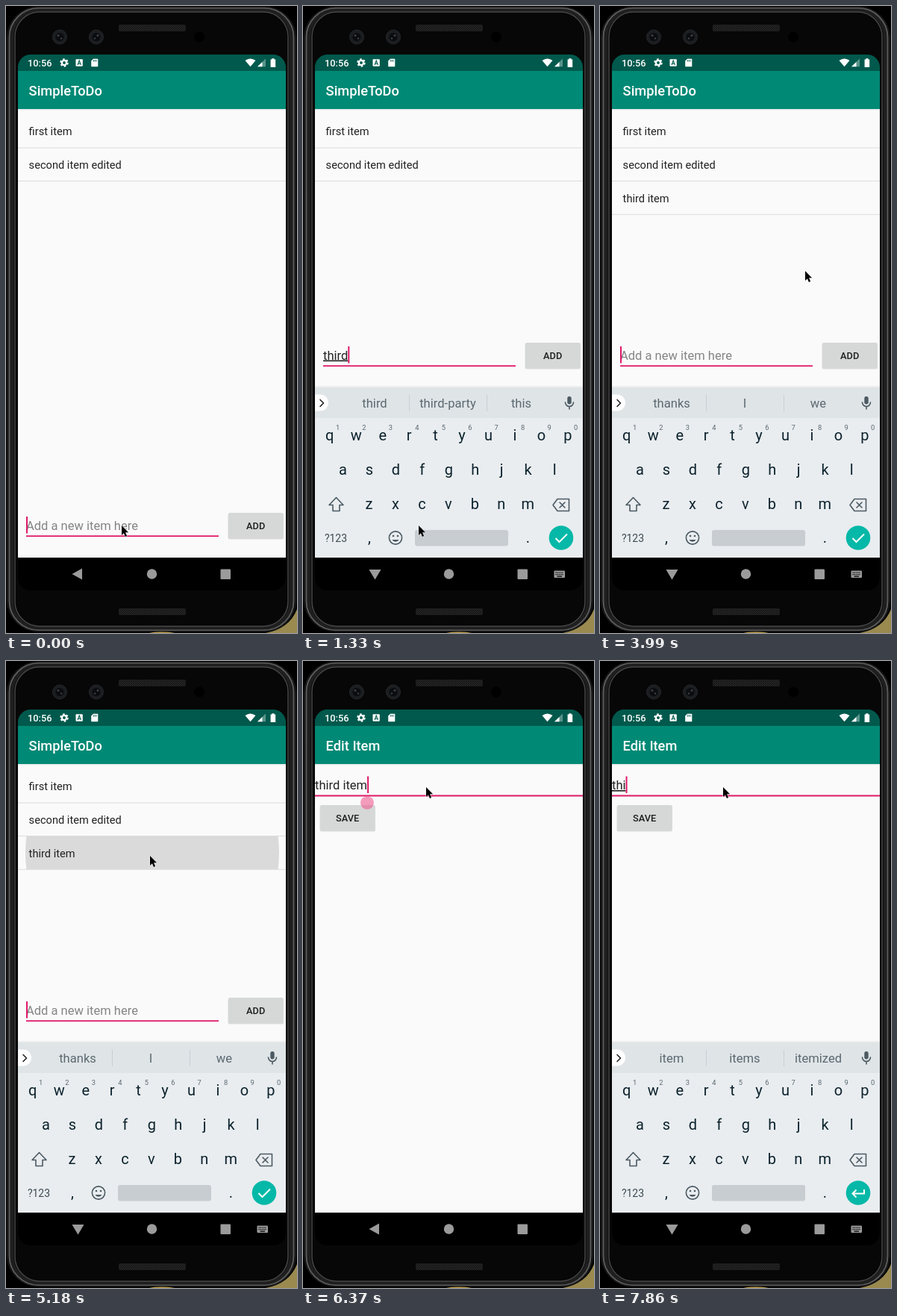
An HTML page that plays this animation: 390 by 840 pixels, repeating every 8 s.

```html
<!DOCTYPE html>
<html lang="en">
<head>
<meta charset="utf-8">
<title>To-do list demo</title>
<style>
html, body { margin: 0; width: 100%; height: 100%; overflow: hidden; background: #000; }
svg { display: block; width: 390px; height: 840px; }
text { font-family: Roboto, sans-serif; white-space: pre; }
.title { font-size: 18.28px; font-weight: 500; fill: #fff; }
.item { font-size: 14.63px; fill: #212121; }
.field { font-size: 16.55px; fill: #222; }
.label { font-size: 12.8px; font-weight: 500; fill: #1f1f1f; text-anchor: middle; }
.toast { font-size: 12.8px; fill: #333; text-anchor: middle; }
.key { font-size: 20px; fill: #0c222c; text-anchor: middle; }
.digit { font-size: 9.3px; fill: #5a6870; text-anchor: middle; }
.suggestion { font-size: 16.6px; fill: #5b6970; text-anchor: middle; }
.composing { text-decoration: underline; text-decoration-thickness: 1px; }
.icon { fill: none; stroke: #4c5a62; stroke-width: 1.6; stroke-linejoin: round; stroke-linecap: round; }
</style>
</head>
<body>
<svg viewBox="0 0 390 840">
  <defs>
    <clipPath id="screenClip"><rect x="16" y="65" width="359" height="718" rx="17"/></clipPath>
    <clipPath id="revealClip"><rect id="reveal" x="16" y="65" width="359" height="718"/></clipPath>
    <clipPath id="imeClip"><rect x="16" y="505" width="359" height="234"/></clipPath>
    <clipPath id="rowClip"><rect x="16" y="235" width="359" height="44"/></clipPath>
    <linearGradient id="shade" x2="0" y2="1">
      <stop stop-color="#000" stop-opacity=".09"/><stop offset="1" stop-color="#000" stop-opacity="0"/>
    </linearGradient>
    <pattern id="mesh" width="3" height="3" patternUnits="userSpaceOnUse">
      <rect width="3" height="3" fill="#262626"/><path d="M0 0L3 3M3 0L0 3" stroke="#141414" stroke-width=".8"/>
    </pattern>
  </defs>

  <!-- Phone body -->
  <rect width="390" height="840" fill="#000"/>
  <path d="M390 808V840H348Q380 834 390 808Z" fill="#9a8a50"/>
  <path d="M192 840Q208 836 226 840Z" fill="#b99a45"/>
  <g fill="none">
    <rect x="1.5" y="1" width="387" height="837" rx="42" fill="#101010" stroke="#1d1d1d"/>
    <rect x="4.5" y="3" width="381" height="833" rx="39" stroke="#5c5c5c" stroke-width="2"/>
    <rect x="8" y="5.5" width="374" height="828" rx="36" stroke="#1f1f1f" stroke-width="4"/>
    <rect x="12" y="8" width="366" height="823" rx="33" fill="#070707" stroke="#484848" stroke-width="1.4"/>
  </g>
  <rect x="151" y="25" width="90" height="9" rx="2" fill="url(#mesh)"/>
  <rect x="151" y="807" width="90" height="9" rx="2" fill="url(#mesh)"/>
  <g fill="#1b1d20" stroke="#25282b">
    <circle cx="72" cy="41.5" r="9.5"/><circle cx="121" cy="41.5" r="9.5"/>
  </g>
  <g fill="#0a0c0e"><circle cx="72" cy="41.5" r="5.5"/><circle cx="121" cy="41.5" r="5.5"/></g>
  <g fill="#3a424a"><circle cx="70" cy="39.5" r="1.5"/><circle cx="74" cy="43.5" r="1.2"/><circle cx="123" cy="39.5" r="1.5"/><circle cx="119" cy="43.5" r="1.2"/></g>
  <circle cx="259" cy="41.5" r="7" fill="#000"/>

  <g clip-path="url(#screenClip)">
    <rect x="16" y="65" width="359" height="718" fill="#000"/>

    <!-- List screen -->
    <g id="list">
      <rect x="16" y="87" width="359" height="652" fill="#fafafa"/>
      <g id="ripple" clip-path="url(#rowClip)"><circle id="rippleDisc" cx="196" cy="257" fill="#dadada"/></g>
      <path d="M16 190H375M16 234.5H375" stroke="#dcdcdc"/>
      <text class="item" x="30.6" y="173">first item</text>
      <text class="item" x="30.6" y="218">second item edited</text>
      <g id="third">
        <path d="M16 279.3H375" stroke="#dcdcdc"/>
        <text class="item" x="30.6" y="263">third item</text>
      </g>
      <g id="entry">
        <text id="hint" class="field" x="27" y="701.5" style="fill:#848484">Add a new item here</text>
        <rect x="27" y="709.3" width="258" height="1.8" fill="#e01868"/>
        <g id="addButton"></g>
      </g>
    </g>
    <rect id="dim" x="16" y="65" width="359" height="718" fill="#000" opacity=".11"/>

    <!-- Edit screen -->
    <g id="editWrap" clip-path="url(#revealClip)">
      <g id="edit">
        <rect x="16" y="87" width="359" height="652" fill="#fafafa"/>
        <rect id="editLine" x="16" y="179.5" width="359"/>
        <g id="saveButton"></g>
      </g>
    </g>

    <g id="typing">
      <text id="typed" class="field"><tspan id="plain"></tspan><tspan id="composing" class="composing"></tspan></text>
      <rect id="caret" width="2" height="22.5" fill="#e01868"/>
    </g>
    <path id="handle" d="M86 180.5L92.5 183.5A9 9 0 1 1 79.5 183.5Z" fill="#f0588f" opacity=".58"/>

    <g id="toast">
      <rect x="122" y="673" width="147" height="44" rx="21" fill="#e6e6e6"/>
      <text class="toast" x="195" y="700">Item added to list.</text>
    </g>

    <!-- Keyboard -->
    <g clip-path="url(#imeClip)">
      <g id="ime">
        <rect x="16" y="509" width="359" height="3" fill="#000" opacity=".05"/>
        <rect x="16" y="511" width="359" height="228" fill="#e9edf0"/>
        <rect x="16" y="511" width="359" height="41" fill="#dfe4e7"/>
        <path d="M16 520.5H23A11 11 0 0 1 23 542.5H16Z" fill="#fff"/>
        <path d="M23 527.5L27.5 532 23 536.5" class="icon" style="stroke:#222"/>
        <path d="M142.5 521V543M246.5 521V543" stroke="#c9d0d4"/>
        <g id="suggestions"></g>
        <rect x="354.3" y="523" width="5.4" height="10.5" rx="2.7" fill="#4c5a62"/>
        <path d="M351.5 531A5.5 5.5 0 0 0 362.5 531M357 537V540" class="icon"/>
        <g id="keys"></g>
        <path d="M44.5 658.5L54 668.5H49V676.5H40V668.5H35Z" class="icon"/>
        <path d="M341 660.5H356.5V676.5H341L335 668.5ZM344 665L351 672M351 665L344 672" class="icon"/>
        <text class="key" x="44" y="718" style="font-size:14px;fill:#3c4a52">?123</text>
        <circle cx="124" cy="712.5" r="8.6" class="icon"/>
        <path d="M119.5 715A5 5 0 0 0 128.5 715Z" fill="#4c5a62"/>
        <circle cx="121" cy="710" r="1.3" fill="#4c5a62"/><circle cx="127" cy="710" r="1.3" fill="#4c5a62"/>
        <rect x="150" y="702" width="125" height="21.5" rx="3" fill="#c8cdd1"/>
        <circle cx="346" cy="712.5" r="16.3" fill="#05b8a7"/>
        <path id="enterIcon" class="icon" style="stroke:#fff;stroke-width:2;stroke-linecap:butt;stroke-linejoin:miter"/>
      </g>
    </g>

    <!-- Navigation bar -->
    <g fill="#9b9b9b">
      <path id="back"/>
      <circle cx="195.5" cy="761" r="6.7"/>
      <rect x="287.5" y="754.5" width="13.5" height="13.5" rx="1"/>
      <g id="imeSwitch">
        <rect x="336.5" y="756.5" width="14.5" height="9.5" rx="1"/>
        <path d="M338.5 759.2H349M338.5 761.6H349" stroke="#000" stroke-width="1.3" stroke-dasharray="1.3 .9"/>
        <path d="M340.5 764.2H347" stroke="#000" stroke-width="1.2"/>
      </g>
    </g>

    <!-- Status bar -->
    <g fill="#fff">
      <text x="29" y="81" style="font-size:12.8px;font-weight:500">10:56</text>
      <circle cx="78" cy="76" r="3.1" fill="none" stroke="#fff" stroke-width="2.4"/>
      <circle cx="78" cy="76" r="4.8" fill="none" stroke="#fff" stroke-width="1.9" stroke-dasharray="2.6 2.426"/>
      <rect x="93.5" y="71.2" width="9.3" height="9.6" rx="1"/>
      <path d="M96 79L98.2 73 100.4 79M96.8 77.2H99.6" fill="none" stroke="#00594c" stroke-width="1.1"/>
      <path d="M117 70.7H122.5Q123.3 70.7 123.3 71.5V80.5Q123.3 81.3 122.5 81.3H115Q114.2 81.3 114.2 80.5V73.5Z"/>
      <path d="M117.3 72.3V74.5M119.2 72.3V74.5M121.1 72.3V74.5" stroke="#00594c"/>
      <path d="M327.5 81.3L320.5 73Q327.5 67.8 334.5 73Z"/>
      <path d="M348 70.5V81.3H337Z" opacity=".35"/><path d="M343.5 75V81.3H337Z"/>
      <path d="M356.4 70.3H359.4V71.4H361.2V82H354.6V71.4H356.4Z"/>
    </g>
  </g>

  <g id="cursor">
    <path d="M0 0V13L2.9 10.2 4.9 14.9 7.1 14 5.1 9.3H9.1Z" stroke="#fff" stroke-width=".9" paint-order="stroke"/>
  </g>
</svg>

<script>
const LOOP = 8000;
const $ = id => document.getElementById(id);
const set = (id, attrs) => { for (const k in attrs) $(id).setAttribute(k, attrs[k]); };
const show = (id, on) => { $(id).style.display = on ? '' : 'none'; };
const label = (cls, x, y, s) => `<text class="${cls}" x="${x}" y="${y}">${s}</text>`;

const appBar = title => `
  <rect x="16" y="65" width="359" height="22" fill="#00594c"/>
  <rect x="16" y="138" width="359" height="2.5" fill="url(#shade)"/>
  <rect x="16" y="87" width="359" height="51" fill="#008975"/>
  ${label('title', 30.6, 120, title)}`;
const button = (x, y, name) => `
  <rect x="${x - .5}" y="${y + .5}" width="74.5" height="35" rx="2.5" fill="#000" opacity=".13"/>
  <rect class="face" x="${x}" y="${y}" width="73.5" height="34" rx="2" fill="#d6d7d7"/>
  ${label('label', x + 36.7, y + 21.6, name)}`;

$('list').insertAdjacentHTML('beforeend', appBar('SimpleToDo'));
$('edit').insertAdjacentHTML('beforeend', appBar('Edit Item'));
$('addButton').innerHTML = button(298, 679, 'ADD');
$('saveButton').innerHTML = button(23, 193, 'SAVE');

const keyRow = (chars, x, y) =>
  [...chars].map((c, i) => label('key', x + i * 35.45, y, c)).join('');
$('keys').innerHTML =
  keyRow('qwertyuiop', 35.8, 582) + keyRow('asdfghjkl', 53.5, 628) + keyRow('zxcvbnm', 88.5, 674) +
  [...'1234567890'].map((c, i) => label('digit', 46.5 + i * 35.45, 567.5, c)).join('') +
  label('key', 89, 719, ',') + label('key', 301.5, 719, '.');
$('suggestions').innerHTML = [96, 194, 292.5].map(x => label('suggestion', x, 538, '')).join('');
const suggestionTexts = [...$('suggestions').children];

// Each step changes only the listed properties; `word` is where the composing word starts.
const START = {
  at: 0, edit: false, text: '', word: 0, caret: true, ime: 0, words: 'thanks,I,we', added: false,
  pressed: false, ripple: 0, focus: false, handle: false, toast: 0, shift: 0, rise: 0, top: 65, mouse: [155, 696]
};
const STEPS = [
  { at: 150, ime: .6 },
  { at: 300, ime: 1 },
  { at: 600, caret: false },
  { at: 890, caret: true, text: 't', words: 'the,to,that' },
  { at: 1040, text: 'th', words: 'the,this,that' },
  { at: 1180, text: 'thi', words: 'this,think,thing' },
  { at: 1330, text: 'third', words: 'third,third-party,this' },
  { at: 1480, text: 'third ', word: 6, words: 'party,time,one' },
  { at: 1630, text: 'third i', words: 'is,in,I' },
  { at: 1780, text: 'third it', words: 'it,its,item' },
  { at: 1920, text: 'third ite', words: 'item,items,ite' },
  { at: 2070, text: 'third item', words: 'item,items,itemized' },
  { at: 2360, mouse: [190, 655] },
  { at: 2510, mouse: [290, 560], caret: false },
  { at: 2660, mouse: [368, 486] },
  { at: 2810, mouse: [342, 472] },
  { at: 2960, mouse: [331, 469], caret: true },
  { at: 3110, pressed: true },
  { at: 3250, text: '', word: 0, added: true, words: 'thanks,I,we' },
  { at: 3400, pressed: false },
  { at: 3550, caret: false },
  { at: 3840, mouse: [318, 440] },
  { at: 3990, mouse: [275, 355], caret: true },
  { at: 4140, mouse: [225, 275] },
  { at: 4280, mouse: [200, 245] },
  { at: 4430, mouse: [194, 256] },
  { at: 4580, mouse: [193, 261] },
  { at: 5180, ripple: 170 },
  { at: 5330, ripple: 200, ime: 0, edit: true, text: 'third item', word: 10, shift: -8, rise: 17, top: 320, toast: .65 },
  { at: 5480, shift: -12, rise: 5.5, top: 98, toast: .25 },
  { at: 5630, shift: 0, rise: 0, top: 65, toast: 0 },
  { at: 5780, mouse: [190, 246] },
  { at: 5920, mouse: [180, 208] },
  { at: 6070, mouse: [169, 178] },
  { at: 6220, mouse: [165, 169] },
  { at: 6370, focus: true, handle: true },
  { at: 6520, ime: .6, word: 6, words: 'item,items,itemized' },
  { at: 6670, ime: 1 },
  { at: 6970, caret: false },
  { at: 7120, caret: true },
  { at: 7260, text: 'third ite', handle: false },
  { at: 7710, text: 'third', word: 0 },
  { at: 7860, text: 'thi' }
];
const states = STEPS.reduce((all, step) => [...all, { ...all[all.length - 1], ...step }], [START]);

function draw(s) {
  const lift = s.ime ? -228 : 0;
  set('list', { transform: `translate(0 ${s.shift})` });
  set('entry', { transform: `translate(0 ${lift})` });
  set('rippleDisc', { r: s.ripple });
  show('third', s.added);
  show('hint', !s.text);
  $('addButton').querySelector('.face').setAttribute('fill', s.pressed ? '#c3c4c4' : '#d6d7d7');

  show('dim', s.edit && s.top > 65);
  show('editWrap', s.edit);
  set('reveal', { y: s.top });
  set('edit', { transform: `translate(0 ${s.rise})` });
  set('editLine', s.focus ? { height: 2, fill: '#e01868' } : { height: 1, fill: '#858585' });

  const x = s.edit ? 16 : 27;
  const y = s.edit ? 172 + s.rise : 701.5 + lift;
  show('typing', y > s.top);
  $('plain').textContent = s.text.slice(0, s.word);
  $('composing').textContent = s.text.slice(s.word);
  set('typed', { x, y });
  set('caret', { x: x + (s.text ? $('typed').getComputedTextLength() : 0), y: y - 17.5 });
  show('caret', s.caret && (!s.edit || s.focus));
  show('handle', s.handle);
  $('toast').style.opacity = s.toast;

  show('ime', s.ime);
  set('ime', { opacity: s.ime, transform: `translate(0 ${(1 - s.ime) * 100})` });
  s.words.split(',').forEach((word, i) => { suggestionTexts[i].textContent = word; });
  set('enterIcon', {
    d: s.edit ? 'M354 708V713.5H339M343.5 708.5L338.5 713.5 343.5 718.5' : 'M338.5 713L343.5 718 354 707.5'
  });
  set('back', { d: s.ime ? 'M88.5 755H104.5L96.5 768.5Z' : 'M102 753.5V768.5L88.5 761Z' });
  show('imeSwitch', s.ime);
  set('cursor', { transform: `translate(${s.mouse})` });
}

let current;
const start = performance.now();
function tick() {
  const time = (performance.now() - start) % LOOP;
  const state = states.findLast(s => s.at <= time);
  if (state !== current) draw(current = state);
  requestAnimationFrame(tick);
}
tick();
</script>
</body>
</html>
```
